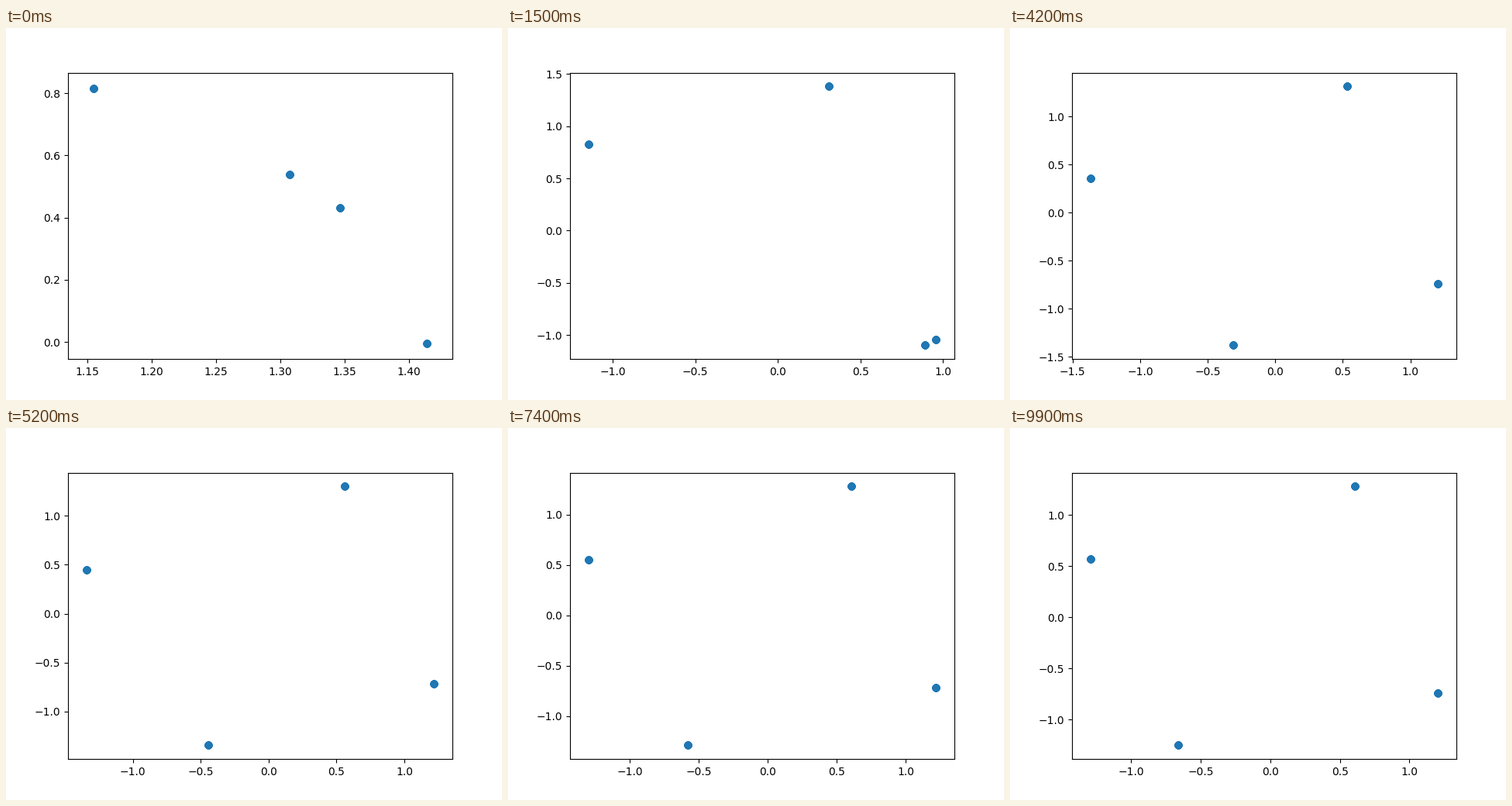
These frames come from a looping animation (640x480 px, 10 s). A matplotlib script:

```python
import numpy as np
import matplotlib.pyplot as plt
from matplotlib.animation import FuncAnimation

FRAMES = 100
RADIUS = np.sqrt(2)
COPIES = 50   # stacked markers give crisp rims
REACH = 3     # pixels a marker adds to the data range

# Key poses: step -> angles in degrees of the four points on the circle
POSES = {
    0: (35.26, 22.4, 17.78, -0.2),
    12: (128, 81, -49, -51.5),
    15: (144.2, 77.3, -47.4, -50.85),
    30: (166.5, 65.4, -42, -60.9),
    42: (165.4, 68, -31.5, -102.6),
    63: (157.8, 64.9, -30, -111.5),
    99: (156.2, 64.5, -31.5, -117.9),
}
times = np.array(list(POSES))
angles = np.radians(list(POSES.values()))

# Speeds at the poses: none at turning points, settling to rest at the end
gaps = np.diff(times)
rates = np.diff(angles, axis=0) / gaps[:, None]
a, b = rates[:-1], rates[1:]
turning = np.where(a * b > 0, 2 * a * b / (a + b), 0)
speeds = np.vstack([rates[0], turning, 0 * rates[0]])


def positions(frame):
    i = min(np.searchsorted(times, frame, side="right") - 1, len(gaps) - 1)
    h = gaps[i]
    u = (frame - times[i]) / h
    v = 1 - u
    theta = (v * v * ((1 + 2 * u) * angles[i] + u * h * speeds[i])
             + u * u * ((1 + 2 * v) * angles[i + 1] - v * h * speeds[i + 1]))
    return RADIUS * np.column_stack([np.cos(theta), np.sin(theta)])


def limits(values, size):
    lo, hi = values.min() - REACH / size, values.max() + REACH / size
    pad = 0.05 * (hi - lo)
    return lo - pad, hi + pad


fig, ax = plt.subplots(figsize=(6.4, 4.8), dpi=100)
dots = ax.scatter(*np.repeat(positions(0), COPIES, axis=0).T, color="C0")


def update(frame):
    pts = positions(frame)
    dots.set_offsets(np.repeat(pts, COPIES, axis=0))
    ax.set_xlim(*limits(pts[:, 0], ax.bbox.width))
    ax.set_ylim(*limits(pts[:, 1], ax.bbox.height))
    return [dots]


anim = FuncAnimation(fig, update, frames=FRAMES, interval=100,
                     repeat=True, repeat_delay=0, blit=False)
plt.show()
```
